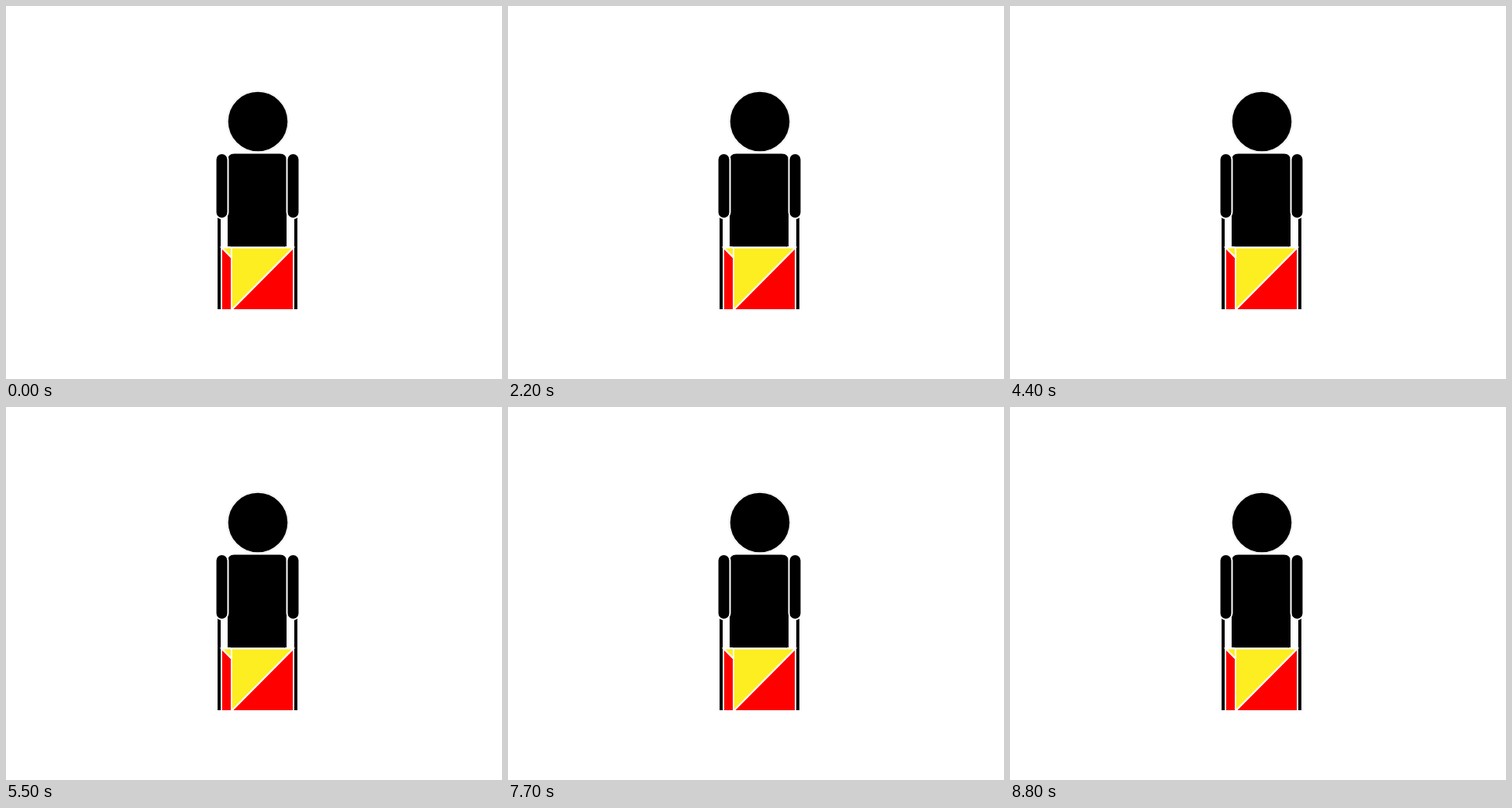
An HTML page that plays this animation: 640 px wide and 481 px high, repeating every 8.9 s.

```html
<!DOCTYPE html>
<html lang="en">
<head>
<meta charset="utf-8">
<title>Flag semaphore</title>
<style>
  html, body { margin: 0; height: 100%; overflow: hidden; background: #fff; }
  svg { display: block; width: 100%; height: 100%; }
</style>
</head>
<body>
<svg viewBox="0 0 640 481">
  <defs>
    <!-- Arm hanging from a shoulder at the origin, flag towards the body -->
    <g id="arm">
      <rect x="1.5" y="70" width="4" height="121" transform="translate(0 2)" stroke="#fff" stroke-width="2" paint-order="stroke"/>
      <g stroke="#fff" stroke-width="2">
        <path d="M.5 113.5H-79.5V194z" fill="#fcee21"/>
        <path d="M.5 113.5V194H-79.5z" fill="#f00"/>
      </g>
      <rect x="-8" y="-8" width="16" height="84" rx="8" stroke="#fff" stroke-width="2"/>
    </g>
  </defs>
  <circle cx="325" cy="149" r="39.7" fill="#fff" stroke="#ddd" stroke-width=".6"/>
  <circle cx="325" cy="149" r="38.3"/>
  <path d="M286 310V199Q286 190.5 294.500 190.500H353.500Q362 190.500 362 199V310H360V393H326V312H323V393H290V310z"/>
  <use href="#arm" id="left"/>
  <use href="#arm" id="right"/>
</svg>
<script>
  const LOOP = 8900, REST = 100, HOLD = 1000;
  const SIGNALS = 'EMBAHEEL';

  // Degrees raised outwards from hanging: [left, right]; negative crosses the body
  const POSES = {
    rest: [0, 0],
    A: [45, 0],
    B: [90, 0],
    E: [0, 135],
    H: [90, -45],
    L: [45, 135],
    M: [45, 90]
  };

  const left = document.getElementById('left');
  const right = document.getElementById('right');

  function setArm(arm, x, side, angle, reach) {
    const flip = angle < 0 ? 'scale(-1 1)' : '';
    arm.setAttribute('transform',
      `translate(${x} 198) scale(${side} 1) rotate(${-angle}) translate(0 ${reach}) ${flip}`);
  }

  function poseAt(time) {
    const t = time % LOOP, cycle = REST + HOLD;
    return t % cycle < REST ? POSES.rest : POSES[SIGNALS[Math.floor(t / cycle)]];
  }

  function draw() {
    const [l, r] = poseAt(performance.now());
    setArm(left, 278.5, -1, l, 0);
    setArm(right, 370.5, 1, r, r >= 90 ? 4 : 0);
    requestAnimationFrame(draw);
  }
  draw();
</script>
</body>
</html>
```
